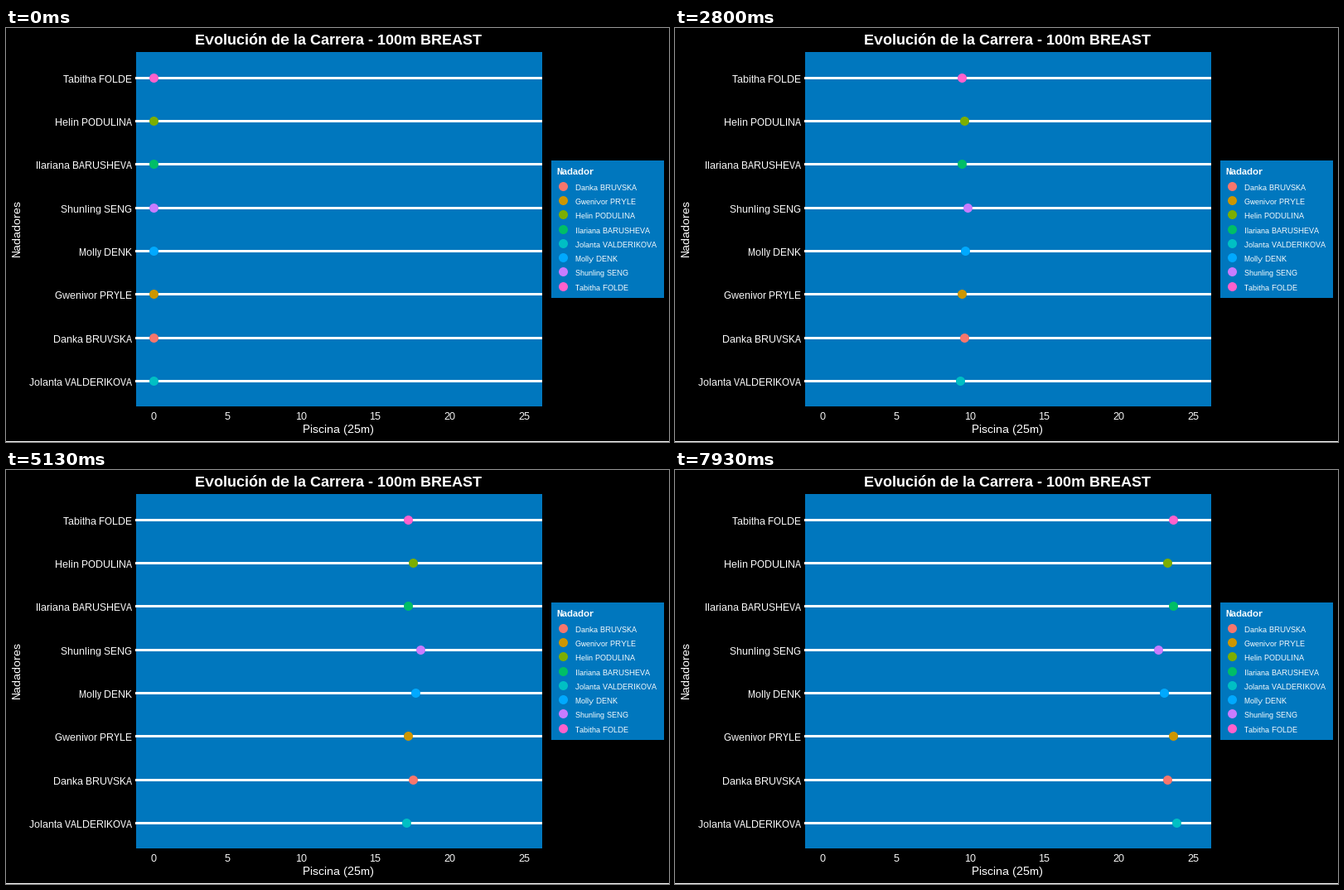
A matplotlib script that plays this animation: 800x500 px, repeating every 8000 ms.

```python
import matplotlib.pyplot as plt
from matplotlib.animation import FuncAnimation
from matplotlib.patches import Circle, Rectangle
from math import floor

W, H, DPI = 800, 500, 100
LOOP, TICK = 8000, 20      # ms
STEPS = 120                # the race advances 15 times a second
X0, SCALE, POOL = 178.5, 17.88, 25
BLUE = "#0077BE"

plt.rcParams.update({
    "font.family": "Liberation Sans",
    "text.hinting": "native",
    "text.hinting_factor": 1,
})

# name, colour, lane (from the top), step of the turn, metres per step after it
SWIMMERS = [
    ("Danka BRUVSKA", "#F8766D", 6, 110, 0.191),
    ("Gwenivor PRYLE", "#CD9600", 5, 112, 0.191),
    ("Helin PODULINA", "#7CAE00", 1, 110, 0.191),
    ("Ilariana BARUSHEVA", "#00BE67", 2, 112, 0.191),
    ("Jolanta VALDERIKOVA", "#00BFC4", 7, 113, 0.183),
    ("Molly DENK", "#00A9FF", 4, 109, 0.194),
    ("Shunling SENG", "#C77CFF", 3, 107, 0.194),
    ("Tabitha FOLDE", "#FF61CC", 0, 112, 0.191),
]

fig = plt.figure(figsize=(W / DPI, H / DPI), dpi=DPI, facecolor="black")
ax = fig.add_axes([0, 0, 1, 1])
ax.set_xlim(0, W)
ax.set_ylim(H, 0)
ax.axis("off")


def box(x0, y0, x1, y1, color):
    ax.add_patch(Rectangle((x0, y0), x1 - x0, y1 - y0, fc=color, lw=0,
                           antialiased=False))


def label(x, y, text, px, ha="left", **kw):
    ax.text(x, y, text, fontsize=px * 72 / DPI, color="white", ha=ha,
            va=kw.pop("va", "baseline"), **kw)


def dot(x, y, color):
    return ax.add_patch(Circle((x, y), 5.5, fc=color, lw=0, zorder=3,
                               snap=False))


def snap(v):
    return floor(v) + 0.5


def lane_y(lane):
    return snap(60.2 + 52.32 * lane)


def distance(step, turn, back):
    if step <= turn:
        return POOL * step / turn
    return POOL - back * (step - turn)


def dot_x(step, turn, back):
    return snap(X0 + SCALE * distance(step, turn, back))


# pool and axes
box(157, 29, 647, 457, BLUE)
box(0, 499, W, H, "white")
label(401.5, 20, "Evolución de la Carrera - 100m BREAST", 18, "center",
      weight="bold")
label(401, 489, "Piscina (25m)", 14, "center")
label(13, 241, "Nadadores", 14, "center", va="center", rotation=90)
for m in range(0, 26, 5):
    label(X0 - 0.5 + SCALE * m, 473, str(m), 12, "center")

# legend
box(658, 160, 794, 326, BLUE)
label(664, 177, "Nadador", 11, weight="bold")

dots = []
for i, (name, color, lane, turn, back) in enumerate(SWIMMERS):
    y = lane_y(lane)
    box(156, y - 1.5, 647, y + 1.5, "white")
    label(152, y + 5.5, name, 12, "right")
    dots.append(dot(dot_x(0, turn, back), y, color))

    key_y = snap(191.2 + 17.28 * i)
    dot(672.5, key_y, color)
    label(687, key_y + 4.5, name, 9)


def update(tick):
    # a step falls on the tick nearest to its time
    step = int((tick * TICK + 14) * STEPS / LOOP)
    for d, (_, _, lane, turn, back) in zip(dots, SWIMMERS):
        d.center = dot_x(min(step, STEPS - 1), turn, back), lane_y(lane)
    return dots


anim = FuncAnimation(fig, update, frames=LOOP // TICK, interval=TICK,
                     repeat=True, repeat_delay=0, blit=False)
plt.show()
```
